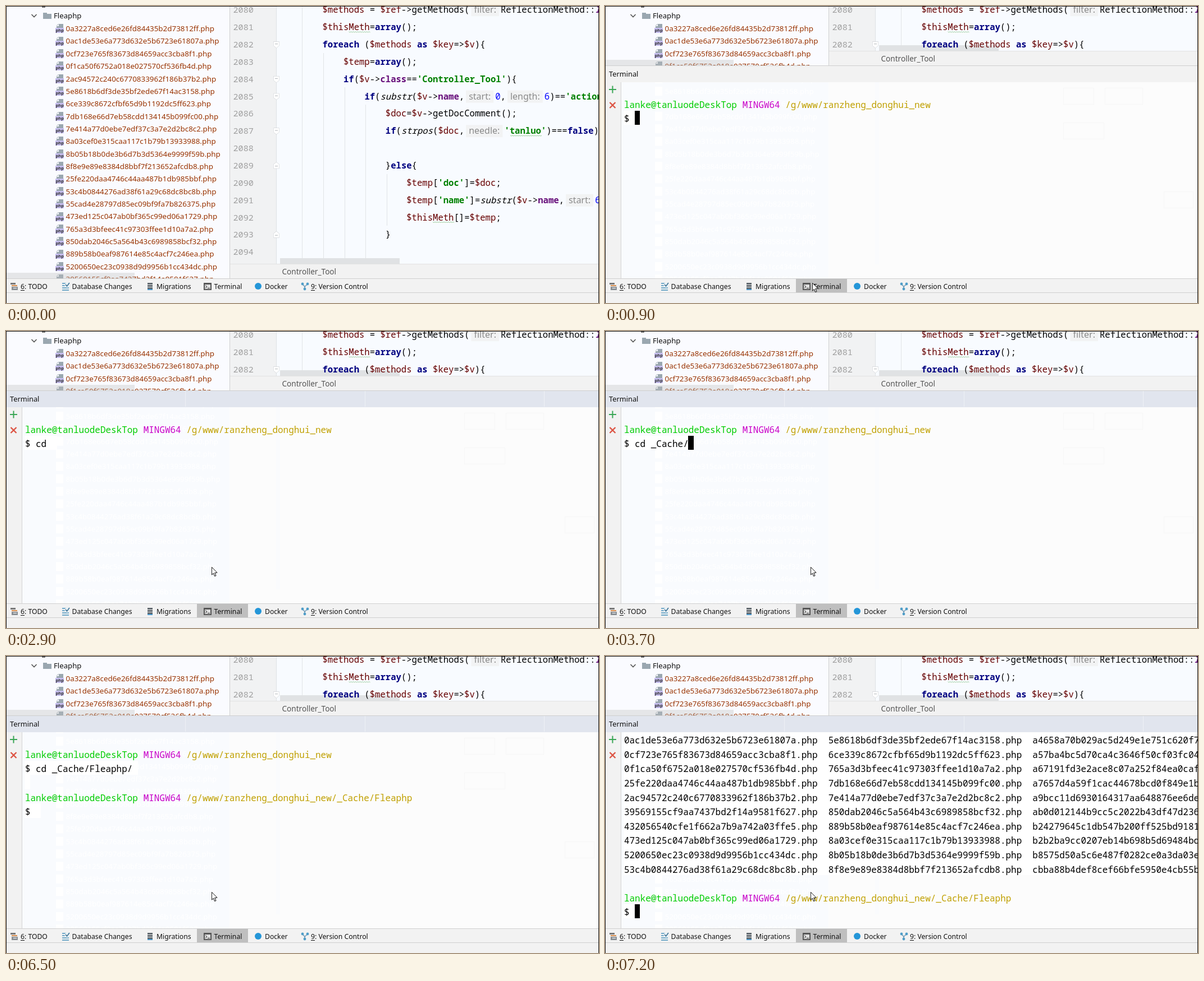
Recreate the animation shown at these times as an HTML page with a canvas. Size 1056x530 px, loop 8000 ms.

```html
<!DOCTYPE html>
<html lang="en">
<head>
<meta charset="utf-8">
<title>Terminal session</title>
<style>
html, body { margin: 0; width: 100%; height: 100%; overflow: hidden; }
canvas { display: block; }
</style>
</head>
<body>
<canvas id="stage" width="1056" height="530"></canvas>
<script>
const ctx = document.getElementById('stage').getContext('2d');
const LOOP = 8000, TICK = 100;
const SANS = '"Noto Sans", "Open Sans", sans-serif';
const MONO = '"Noto Sans Mono", "DejaVu Sans Mono", monospace';
const CELL = 9.58, ROW = 25.6, TERM_X = 33.9, TERM_Y = 135.8;
const LINE = 30.86;

const files = `0a3227a8ced6e26fd84435b2d73812ff 0ac1de53e6a773d632e5b6723e61807a
0cf723e765f83673d84659acc3cba8f1 0f1ca50f6752a018e027570cf536fb4d
2ac94572c240c6770833962f186b37b2 5e8618b6df3de35bf2ede67f14ac3158
6ce339c8672cfbf65d9b1192dc5ff623 7db168e66d7eb58cdd134145b099fc00
7e414a77d0ebe7edf37c3a7e2d2bc8c2 8a03cef0e315caa117c1b79b13933988
8b05b18b0de3b6d7b3d5364e9999f59b 8f8e9e89e8384d8bbf7f213652afcdb8
25fe220daa4746c44aa487b1db985bbf 53c4b0844276ad38f61a29c68dc8bc8b
55cad4e28797d85ec09bf9fa7b826375 473ed125c047ab0bf365c99ed06a1729
765a3d3bfeec41c97303ffee1d10a7a2 850dab2046c5a564b43c6989858bcf32
889b58b0eaf987614e85c4acf7c246ea 5200650ec23c0938d9d9956b1cc434dc
39569155cf9aa7437bd2f14a9581f627 432056540cfe1f662a7b9a742a03ffe5`.split(/\s+/).map(f => f + '.php');

// Third listing column runs off the right edge
const cutOff = `a15cc576d26e3d0b23c3829770fae73 a4658a70b029ac5d249e1e751c620f7
a57ba4bc5d70ca4c3646f50cf03fc04 a67191fd3e2ace8c07a252f84ea0caf
a7657d4a59f1cac44678bcd0f849e1b a9bcc11d6930164317aa648876ee6de
ab0d012144b9cc5c2022b43df47d236 b24279645c1db547b200ff525bd9181
b2b2ba9cc0207eb14b698b5d69484bd b8575d50a5c6e487f0282ce0a3da03e
cbba88b4def8cef66bfe5950e4cb55b`.split(/\s+/);

const sorted = [...files].sort();
const listing = cutOff.map((c, i) => [sorted[i], sorted[i + 11], c].join('  '));

// Code lines: indent, then tokens whose first letter is the style
const styles = {
  p: ['500', '#000'], v: ['500', '#660000'], k: ['bold', '#000080'], s: ['bold', '#008000'],
  n: ['500', '#0000ff'], f: ['italic 500', '#000'], m: ['bold', '#660e7a'], c: ['italic bold', '#660e7a']
};
const code = [
  [0, 'v$methods', 'p = ', 'v$ref', 'p->getMethods(', 'hfilter:', 'pReflectionMethod::', 'cIS'],
  [0, 'v$thisMeth', 'p=', 'karray', 'p();'],
  [0, 'kforeach', 'p (', 'v$methods', 'p ', 'kas', 'p ', 'v$key', 'p=>', 'v$v', 'p){'],
  [1, 'v$temp', 'p=', 'karray', 'p();'],
  [1, 'kif', 'p(', 'v$v', 'p->', 'mclass', 'p==', "s'Controller_Tool'", 'p){'],
  [2, 'kif', 'p(', 'fsubstr', 'p(', 'v$v', 'p->', 'mname', 'p,', 'hstart:', 'n0', 'p,', 'hlength:', 'n6', 'p)==', "s'action"],
  [3, 'v$doc', 'p=', 'v$v', 'p->getDocComment();'],
  [3, 'kif', 'p(', 'fstrpos', 'p(', 'v$doc', 'p,', 'hneedle:', "s'tanluo'", 'p)===', 'kfalse', 'p)'],
  [0],
  [3, 'p}', 'kelse', 'p{'],
  [4, 'v$temp', 'p[', "s'doc'", 'p]=', 'v$doc', 'p;'],
  [4, 'v$temp', 'p[', "s'name'", 'p]=', 'fsubstr', 'p(', 'v$v', 'p->', 'mname', 'p,', 'hstart:', 'n6'],
  [4, 'v$thisMeth', 'p[]=', 'v$temp', 'p;'],
  [3, 'p}'],
  [0]
];

function rect(x, y, w, h, color) {
  ctx.fillStyle = color;
  ctx.fillRect(x, y, w, h);
}

function text(s, x, y, font, color) {
  ctx.font = font;
  ctx.fillStyle = color;
  ctx.fillText(s, x, y);
}

function stroke(points, color, width = 1, close = false) {
  ctx.beginPath();
  points.forEach(([x, y]) => ctx.lineTo(x, y));
  if (close) ctx.closePath();
  ctx.strokeStyle = color;
  ctx.lineWidth = width;
  ctx.stroke();
}

function dot(x, y, r, color) {
  ctx.beginPath();
  ctx.arc(x, y, r, 0, 7);
  ctx.fillStyle = color;
  ctx.fill();
}

function clipped(x, y, w, h, draw) {
  ctx.save();
  ctx.beginPath();
  ctx.rect(x, y, w, h);
  ctx.clip();
  draw();
  ctx.restore();
}

function fileIcon(y) {
  rect(94, y - 8, 8, 8, '#9aa7b0');
  rect(90, y - 4, 4, 4, '#9aa7b0');
  stroke([[90, y - 4.5], [93.5, y - 8]], '#9aa7b0');
  rect(88, y - 1, 15, 9, '#c5bdee');
  text('php', 88.5, y + 5.5, 'bold 7.5px ' + SANS, '#333');
}

function fileRows(color, ghost) {
  files.slice(0, 21).forEach((name, i) => {
    const y = 40.3 + i * 22.35;
    if (ghost) rect(89, y - 8, 13, 16, color);
    else fileIcon(Math.round(y));
    text(name, 106.5, y + 4.8, '13.4px ' + SANS, color);
  });
}

function tree(bottom) {
  rect(1, 1, 397, bottom - 1, '#fafbff');
  clipped(1, 1, 397, bottom - 1, () => {
    rect(64, 1, 6, 2, '#777');
    stroke([[45.5, 15], [50, 19.5], [54.5, 15]], '#555', 1.6);
    rect(66, 12, 7, 3, '#9aa7b0');
    rect(66, 14, 15, 9, '#9aa7b0');
    text('Fleaphp', 85, 22, '13.2px ' + SANS, '#111');
    fileRows('#993300');
    rect(1, bottom - 10, 228, 10, 'rgba(190,190,190,.35)');
  });
  rect(398, 1, 1, bottom - 1, '#d0d0d0');
}

function foldMark(row, end) {
  const y = 7 + row * LINE, d = end ? -1 : 1;
  ctx.fillStyle = '#fff';
  stroke([[476.5, y - 5 * d], [486.5, y - 5 * d], [486.5, y + 2 * d], [481.5, y + 6 * d], [476.5, y + 2 * d]], '#c4c8cc', 1, true);
  ctx.fill();
  stroke([[479, y - d], [484, y - d]], '#b0b4b8');
}

function squiggle(x, row, width) {
  const y = 15 + row * LINE, points = [];
  for (let i = 0; i <= width; i += 2) points.push([x + i, y + i % 4 / 2]);
  stroke(points, '#9ccc9c');
}

function codeLine([indent, ...tokens], i) {
  const y = 12.3 + i * LINE;
  let x = 563.5 + indent * 37.44;
  text(String(2080 + i), 404.5, y, '15.2px ' + MONO, '#a0a0a0');
  for (const token of tokens) {
    const s = token.slice(1);
    if (token[0] === 'h') {
      ctx.font = '16px ' + SANS;
      const w = ctx.measureText(s).width + 16;
      rect(x + 3, y - 16, w - 6, 22, '#f2f3f4');
      text(s, x + 8, y, ctx.font, '#8a8a8a');
      x += w;
    } else {
      const [face, color] = styles[token[0]];
      text(s, x, y, `${face} 15.6px ${MONO}`, color);
      x += ctx.measureText(s).width;
    }
  }
}

function editor(bottom) {
  const end = bottom - 26;
  rect(399, 1, 82, end - 1, '#f1f2f3');
  rect(481, 1, 574, end - 1, '#f8fbff');
  clipped(399, 1, 656, end - 1, () => {
    rect(481, 1, 1, end, '#dfe2e5');
    [[527, 0, 455], [565, 84, 455], [603, 145, 455], [640, 176, 455], [678, 300, 392]]
      .forEach(([x, a, b]) => rect(x, a, 1, b - a, '#e1e4e6'));
    rect(488, end - 10, 213, 10, '#e0e2e4');
    [2, 4, 5, 7].forEach(r => foldMark(r));
    [9, 13].forEach(r => foldMark(r, true));
    code.forEach(codeLine);
    squiggle(610.5, 1, 38);
    squiggle(760, 12, 38);
    squiggle(898, 7, 56);
  });
  rect(399, end, 656, 26, '#f2f2f2');
  rect(399, end, 656, 1, '#e2e2e2');
  text('Controller_Tool', 491.5, bottom - 7, '13.6px ' + SANS, '#555');
}

function toolBar(fill) {
  rect(1, 486, 1054, 44, '#f2f2f2');
  rect(1, 486, 1054, 1, '#d0d0d0');
  rect(1, 511, 1054, 1, '#cfcfcf');
  if (fill) rect(340, 487, 91, 24, fill);

  rect(8, 494, 9, 3, '#777');
  rect(10, 498, 10, 2, '#d58a4a');
  rect(10, 501, 11, 6, '#8a8f94');
  rect(13, 503, 6, 1, '#fff');

  [494, 498, 502, 506].forEach(y => rect(100, y, 12, 2, '#6fa8c8'));
  dot(109, 498, 4.5, '#e8f0f4');
  stroke([[106, 497], [108.5, 500], [113, 494]], '#3a6f92', 1.5);

  [494, 498, 502].forEach(y => rect(252, y, 9, 3, '#60686e'));
  rect(252, 505, 9, 2, '#4a9ad0');

  rect(352, 494, 14, 13, '#555');
  rect(354, 497, 10, 8, '#dedede');
  stroke([[355, 498.5], [358, 501], [355, 503.5]], '#333');
  rect(359, 503, 4, 1, '#333');

  dot(449, 500, 6, '#2496d8');

  stroke([[528, 496], [532, 501], [537, 496]], '#6b98b4', 1.5);
  stroke([[532, 501], [532, 506]], '#6b98b4', 1.5);
  [[528, 496], [537, 496], [532, 505]].forEach(([x, y]) => dot(x, y, 2.4, '#4f9dc8'));

  const labels = { '6: TODO': 26, 'Database Changes': 117.5, 'Migrations': 268, 'Terminal': 370.5, 'Docker': 461, '9: Version Control': 543 };
  for (const s in labels) text(s, labels[s], 505.3, '12.2px ' + SANS, '#111');
  rect(26, 507, 7, 1, '#111');
  rect(543, 507, 7, 1, '#111');
}

// Last entry whose start time has passed
const latest = (list, t) => list.filter(([start]) => start <= t).pop()[1];

const home = 'lanke@tanluodeDeskTop MINGW64 /g/www/ranzheng_donghui_new';
const cache = home + '/_Cache/Fleaphp';
const typed = [
  [0, ''], [2100, 'c'], [2200, 'cd'], [2400, 'cd '], [3200, 'cd _'], [3400, 'cd _c'],
  [3700, 'cd _Cache/'], [5000, 'cd _Cache/f'], [5400, 'cd _Cache/Fleaphp/']
];
const typedNext = [[0, ''], [6800, 'l'], [6900, 'ls']];
const caretOff = [[1400, 1900], [2900, 3200], [4600, 5000], [6500, 6800]];

// The caret sits after the last line
function screen(t) {
  if (t >= 7200) return [...listing.slice(1), '', cache, '$ '];
  if (t >= 7100) return ['$ ls', ...listing, ''];
  const lines = ['', home, '$ ' + latest(typed, t)];
  if (t < 5900) return lines;
  lines[2] += ' ';
  if (t < 6000) return [...lines, ''];
  lines.push(' ', cache, '$ ' + latest(typedNext, t));
  if (t >= 7000) lines.push('');
  return lines;
}

// Fills whole pixels of the terminal grid
function cells(col, row, count, color) {
  const x = Math.floor(TERM_X + col * CELL), y = Math.floor(TERM_Y + row * ROW);
  const right = Math.floor(TERM_X + (col + count) * CELL), bottom = Math.floor(TERM_Y + (row + 1) * ROW);
  rect(x, y, right - x, bottom - y, color);
}

function terminal(t) {
  rect(1, 106, 1054, 1, '#cfcfcf');
  rect(1, 107, 1054, 29, t < 1000 ? '#f2f2f2' : '#e1e5ee');
  if (t >= 1000) [319, 639, 958].forEach(x => rect(x, 107, 1, 28, '#eef0f5'));
  text('Terminal', 7, 126, '12.8px ' + SANS, '#111');
  rect(1, 136, 28, 350, '#f2f2f2');
  rect(28, 136, 1, 350, '#d4d4d4');
  stroke([[7, 149], [20, 149]], '#3aa655', 2);
  stroke([[13.5, 142.5], [13.5, 155.5]], '#3aa655', 2);
  stroke([[8.5, 172], [18.5, 182]], '#dd5544', 2.4);
  stroke([[18.5, 172], [8.5, 182]], '#dd5544', 2.4);

  clipped(29, 136, 1026, 350, () => {
    rect(29, 136, 369, 350, '#f9fbfe');
    rect(398, 136, 657, 350, '#fcfcfc');
    rect(481, 136, 7, 325, '#fafbfd');
    fileRows('#fff', true);
    ctx.lineWidth = 1;
    ctx.strokeStyle = '#f6f6f6';
    [[816.5, 146.5, 54], [890.5, 146.5, 67], [816.5, 208.5, 72], [995.5, 331.5, 52]]
      .forEach(([x, y, w]) => ctx.strokeRect(x, y, w, 29));

    const lines = screen(t), font = `500 ${CELL / .6}px ${MONO}`;
    lines.forEach((line, row) => {
      const base = TERM_Y + row * ROW + 20.3;
      if (line.includes('MINGW64')) {
        let x = TERM_X;
        line.split(' ').forEach((part, i) => {
          text(part, x, base, font, ['#00cc00', '#c800c8', '#c0a000'][i]);
          x += (part.length + 1) * CELL;
        });
      } else {
        cells(0, row, line.length, '#fff');
        text(line, TERM_X, base, font, '#000');
      }
    });
    const last = lines.length - 1;
    const off = caretOff.some(([a, b]) => t >= a && t < b);
    cells(lines[last].length, last, 1, off ? '#fff' : '#000');
  });
}

function pointer(t) {
  if (t < 100) return;
  const mix = (a, b, k) => a + (b - a) * k;
  const ramp = (start, end) => Math.max(0, Math.min(1, (t - start) / (end - start)));
  const k = ramp(100, 400), enter = k * k * (3 - 2 * k), leave = ramp(900, 1200);
  const x = mix(mix(979, 369.5, enter), 366.5, leave);
  const y = mix(mix(144.5, 494.5, enter), 421.5, leave);
  const shape = [[0, 0], [0, 13.5], [3, 10.8], [5.2, 16], [7.4, 15], [5.2, 10], [9.5, 9.6]];
  stroke(shape.map(([a, b]) => [x + a, y + b]), '#222', 1, true);
  ctx.fillStyle = '#fff';
  ctx.fill();
  ctx.stroke();
}

function frame(now) {
  const t = Math.floor(now % LOOP / TICK) * TICK;
  const open = t >= 900, bottom = open ? 106 : 486;
  tree(bottom);
  editor(bottom);
  if (open) terminal(t);
  toolBar(open ? '#bfbfbf' : t >= 400 ? '#d9d9d9' : '');
  rect(0, 0, 1056, 1, '#111');
  rect(0, 0, 1, 530, '#111');
  rect(1055, 0, 1, 530, '#111');
  pointer(t);
  requestAnimationFrame(frame);
}
requestAnimationFrame(frame);
</script>
</body>
</html>
```
